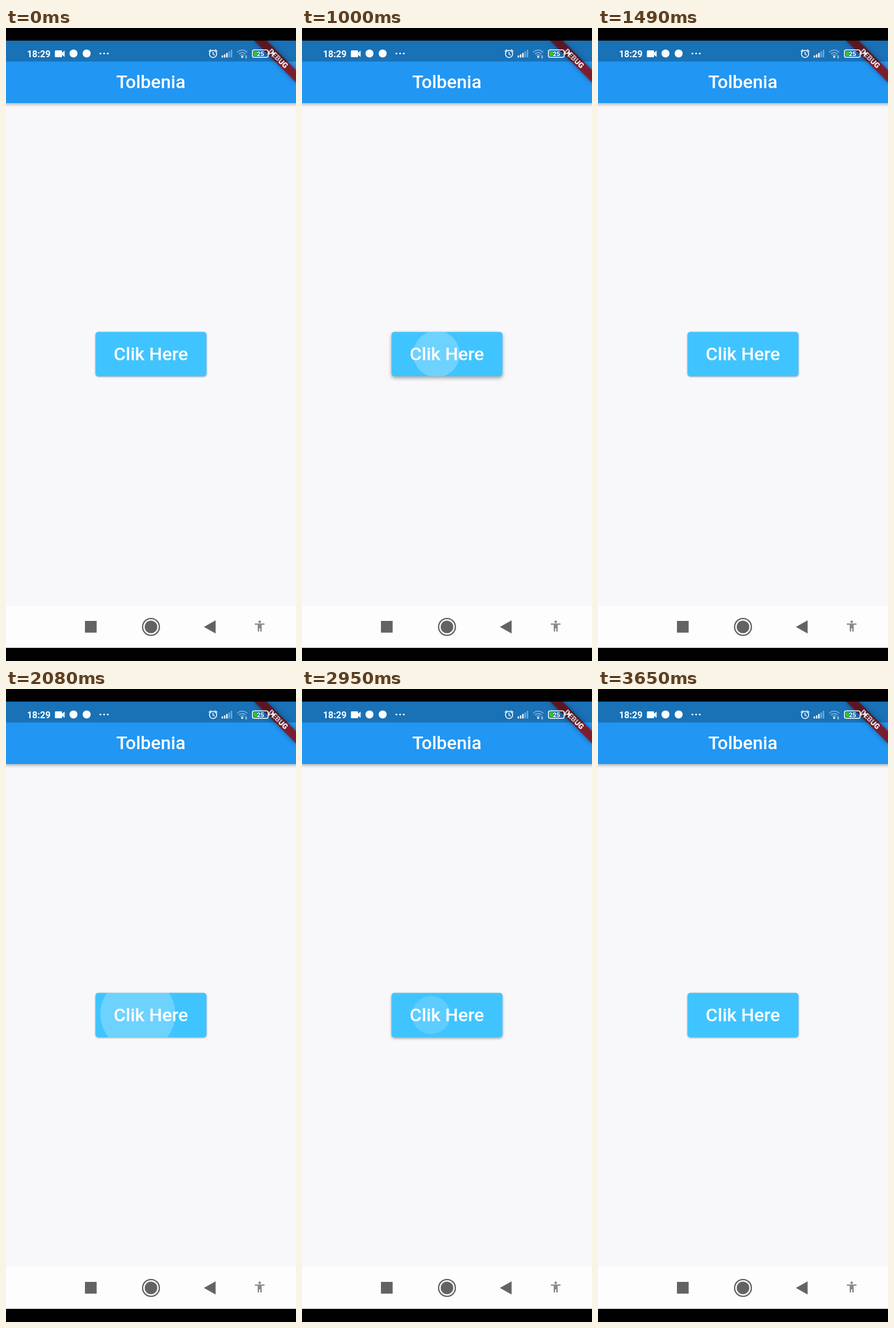
Recreate the animation shown at these times as an HTML page. Size 507x1105 px, loop 3.69 s.

```html
<!DOCTYPE html>
<html lang="en">
<head>
<meta charset="utf-8">
<title>Button ripple</title>
<style>
html, body { margin: 0; width: 100%; height: 100%; overflow: hidden; background: #000; }
svg { display: block; width: 507px; height: 1105px; font-family: Roboto, sans-serif; text-anchor: middle; }
.title { font-size: 32px; font-weight: 500; fill: #fff; }
.bar { filter: drop-shadow(0 2px 3px rgba(0, 0, 0, .32)); }
.banner { filter: drop-shadow(0 0 4px rgba(0, 0, 0, .5)); }
</style>
</head>
<body>
<svg viewBox="0 0 507 1105">
  <defs>
    <clipPath id="screen"><path d="M0 22H507V1082H0z"/></clipPath>
    <clipPath id="face"><rect x="156.5" y="530.5" width="194" height="77.5" rx="5"/></clipPath>
  </defs>
  <path d="M0 0H507V1105H0z"/>
  <g clip-path="url(#screen)">
    <path d="M0 22H507V1082H0z" fill="#f8f8fa"/>
    <path class="bar" d="M-10 10H517V131H-10z" fill="#2196f3"/>
    <text class="title" x="253.3" y="105.3">Tolbenia</text>

    <rect id="button" x="156.5" y="530.5" width="194" height="77.5" rx="5" fill="#40c4ff"/>
    <g clip-path="url(#face)"><circle id="ripple" fill="#fff"/></g>
    <text class="title" x="253.3" y="580">Clik Here</text>

    <g transform="translate(507 22) rotate(45)">
      <path class="banner" d="M-52 36.2H52V51.7H-52z" fill="#a00000" fill-opacity=".72"/>
      <text y="48.6" font-size="13.1" font-weight="900" fill="#fff">DEBUG</text>
    </g>
    <path d="M0 22H507V58.5H0z" fill-opacity=".25"/>

    <!-- status bar -->
    <g fill="#fff">
      <text x="57.3" y="50.5" font-size="16" font-weight="700">18:29</text>
      <path d="M87 39H96.500Q98 39 98 40.500V43L102.500 39.500V50.500L98 47V49.500Q98 51 96.500 51H87Q85.500 51 85.500 49.500V40.500Q85.500 39 87 39z"/>
      <circle cx="118" cy="44.500" r="7"/>
      <circle cx="141" cy="44.500" r="7"/>
      <circle cx="165" cy="44.500" r="1.600"/>
      <circle cx="171.500" cy="44.500" r="1.600"/>
      <circle cx="178" cy="44.500" r="1.600"/>
      <path d="M377 48h2.500v3.500h-2.500zM381 46h2.500v5.500h-2.500zM385 43.500h2.500v8h-2.500z"/>
      <path d="M389 41h2.500v10.500h-2.500zM393 38h2.500v13.500h-2.500z" opacity=".4"/>
      <circle cx="413" cy="50.500" r="1.800"/>
      <path d="M418 50l1.800-2.500 1.800 2.500zM418 51l1.800 2.500 1.800-2.500z" opacity=".8"/>
      <path d="M433 40.500h6.500v8.500h-6.500z" fill="#36c12c"/>
      <text x="445" y="48.800" font-size="11" font-weight="700">25</text>
      <path d="M468 38l-5.500 7h3.500l-2 6 8-8h-4.500z"/>
    </g>
    <g fill="none" stroke="#fff" stroke-width="1.500">
      <circle cx="362" cy="45.300" r="6.300"/>
      <path d="M362 41.500V45.500L365 47.500M354.500 41l4-3.500M365.500 37.500l4 3.500"/>
      <rect x="430.800" y="38.300" width="27.500" height="13" rx="3"/>
      <path d="M460 43V47"/>
      <path d="M404 42.500Q413 34.500 422 42.500M407 45.500Q413 40 419 45.500M409.700 48.300Q413 45 416.300 48.300" opacity=".5"/>
    </g>

    <!-- navigation bar -->
    <path d="M0 1009H507V1082H0z" fill="#fdfdfd"/>
    <g fill="#636363">
      <path d="M138 1035H158.500V1055.500H138z"/>
      <circle cx="253.500" cy="1045.500" r="11"/>
      <circle cx="253.500" cy="1045.500" r="14.700" fill="none" stroke="#636363" stroke-width="2.300"/>
      <path d="M346 1045.500L366.500 1034V1057z"/>
    </g>
    <g fill="#8a8a84">
      <circle cx="443.500" cy="1036.500" r="2.200"/>
      <path d="M435 1039.500H452V1041.800H447V1053.500H444.500V1048H442.500V1053.500H440V1041.800H435z"/>
    </g>
  </g>
</svg>
<script>
const LOOP = 3690, CENTER = [253.5, 569.2], R0 = 31, R1 = 111;
const taps = [
  { down: 885, up: 1032, x: 232.5, y: 569 },
  { down: 1976, up: 2036, x: 213, y: 566 },
  { down: 2905, up: 3025, x: 225, y: 569 }
];
const button = document.getElementById('button');
const ripple = document.getElementById('ripple');
const clamp = v => Math.min(1, Math.max(0, v));
const mix = (a, b, p) => a + (b - a) * p;

// cubic-bezier(.25, .1, .25, 1)
function ease(t) {
  let lo = 0, hi = 1;
  for (let i = 0; i < 18; i++) {
    const s = (lo + hi) / 2, q = 1 - s;
    if (.75 * s * q + s * s * s < t) lo = s; else hi = s;
  }
  const q = 1 - lo;
  return .3 * q * q * lo + 3 * q * lo * lo + lo ** 3;
}

function draw(t) {
  const tap = taps.find(k => t >= k.down && t < k.up + 375);
  let alpha = 0, lift = 0;
  if (tap) {
    const { down, up, x, y } = tap;
    // slow growth while held, fast after release
    const held = Math.min(t, up) - down, freed = Math.max(0, t - up);
    const p = ease(clamp(held / 1000 + freed / 225));
    alpha = .24 * clamp((t - down) / 75) * (1 - clamp((freed - 225) / 150));
    lift = clamp(clamp(held / 200) - freed / 200);
    ripple.setAttribute('cx', mix(x, CENTER[0], p));
    ripple.setAttribute('cy', mix(y, CENTER[1], p));
    ripple.setAttribute('r', mix(R0, R1, p));
  }
  ripple.setAttribute('fill-opacity', alpha);
  button.style.filter =
    `drop-shadow(0 ${mix(1.5, 5, lift)}px ${mix(1.4, 4.5, lift)}px rgba(0,0,0,.36))`;
}

const start = performance.now();
function tick() {
  draw((performance.now() - start) % LOOP);
  requestAnimationFrame(tick);
}
tick();
</script>
</body>
</html>
```
